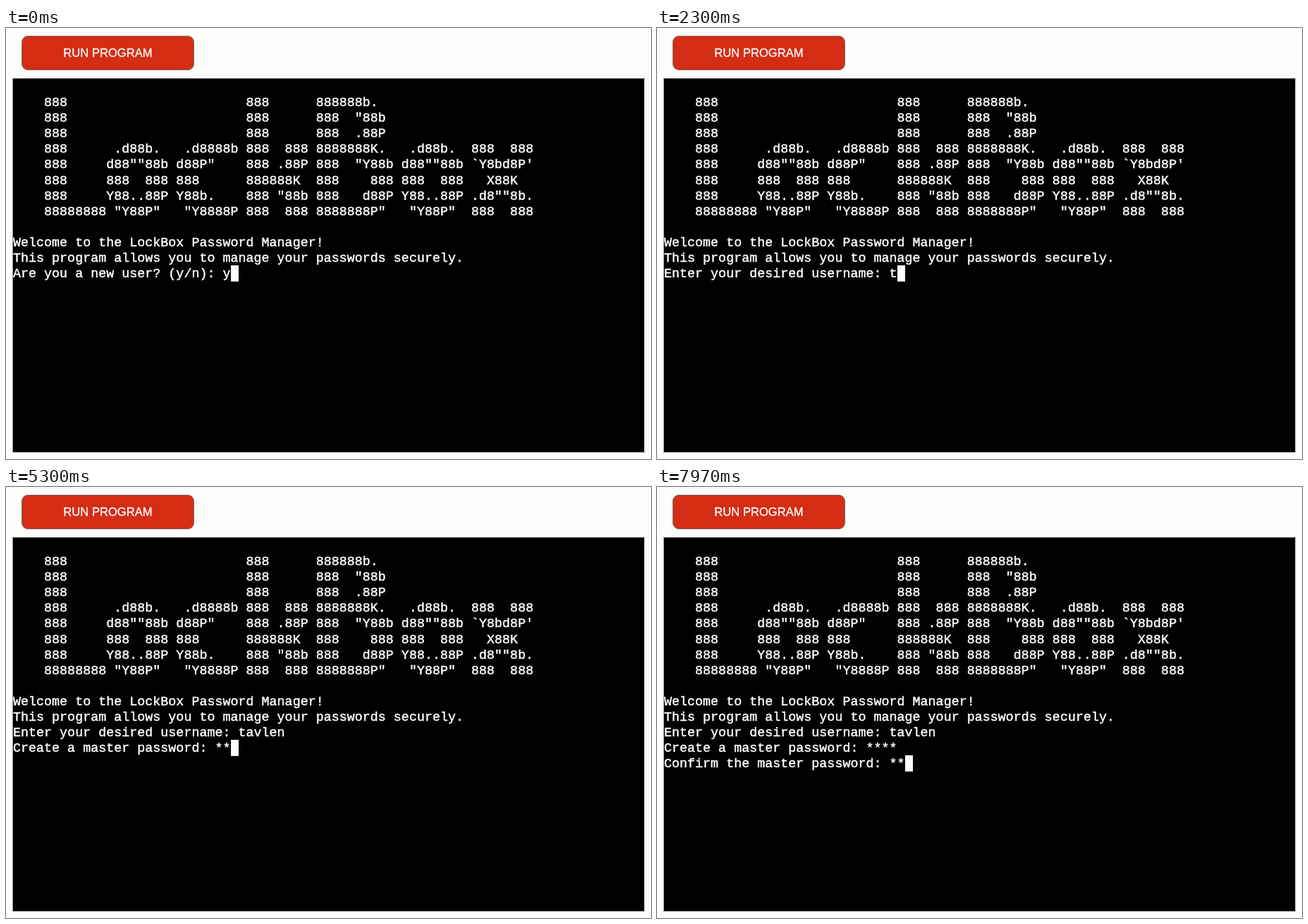
Recreate the animation shown at these times as an HTML page. Size 915 by 612 pixels, loop 8 s.

```html
<!DOCTYPE html>
<html lang="en">
<head>
<meta charset="utf-8">
<title>LockBox terminal</title>
<style>
  html, body { margin: 0; width: 100%; height: 100%; overflow: hidden; background: #fdfdfb; }
  .run {
    position: absolute; left: 22px; top: 11px; width: 245px; height: 49px;
    box-sizing: border-box; border: 1.5px solid #77706c; border-radius: 9px;
    background: #d42d14; color: #fff; -webkit-text-stroke: 0.3px #fff;
    font: 16.6px/47px "Liberation Sans", Arial, sans-serif; text-align: center; white-space: nowrap;
  }
  .term {
    --row: 22.1px; --col: 11.03px;
    position: absolute; left: 10px; top: 72px; width: 895px; height: 530px;
    overflow: hidden; background: #000; color: #fff; box-shadow: 0 0 0 1px #0006;
    font: 18.38px/var(--row) "Liberation Mono", "Courier New", monospace;
  }
  pre {
    position: absolute; left: 0; top: 2px; margin: 0; font: inherit;
    -webkit-text-stroke: 0.45px #fff;
  }
  #cursor {
    position: absolute; width: 11px; height: 23px; background: #fff;
    left: calc(var(--x) * var(--col)); top: calc(var(--y) * var(--row));
  }
</style>
</head>
<body>
<div class="run">RUN PROGRAM</div>
<div class="term"><pre id="screen"></pre><div id="cursor"></div></div>
<script>
const LOOP = 8000;
const intro = String.raw`
    888                       888      888888b.
    888                       888      888  "88b
    888                       888      888  .88P
    888      .d88b.   .d8888b 888  888 8888888K.   .d88b.  888  888
    888     d88""88b d88P"    888 .88P 888  "Y88b d88""88b ${"`"}Y8bd8P'
    888     888  888 888      888888K  888    888 888  888   X88K
    888     Y88..88P Y88b.    888 "88b 888   d88P Y88..88P .d8""8b.
    88888888 "Y88P"   "Y8888P 888  888 8888888P"   "Y88P"  888  888

Welcome to the LockBox Password Manager!
This program allows you to manage your passwords securely.`.split("\n");

// Each prompt: start time, answer rows kept above it, label, typed text, key times.
const prompts = [
  { at: 0, keep: 0, label: "Are you a new user? (y/n): ", input: "y", keys: [0] },
  { at: 1140, keep: 0, label: "Enter your desired username: ", input: "tavlen",
    keys: [2300, 2470, 2640, 2940, 3140, 3270] },
  { at: 3770, keep: 1, label: "Create a master password: ", input: "****",
    keys: [4600, 4770, 6540, 6570] },
  { at: 6940, keep: 2, label: "Confirm the master password: ", input: "**",
    keys: [7640, 7800] }
];

const screen = document.getElementById("screen");
const cursor = document.getElementById("cursor");
let shown = "";

function linesAt(t) {
  let answers = [];
  for (const { at, keep, label, input, keys } of prompts) {
    if (t < at) break;
    const typed = keys.filter(k => k <= t).length;
    answers = [...answers.slice(0, keep), label + input.slice(0, typed)];
  }
  return [...intro, ...answers];
}

function draw(now) {
  const lines = linesAt(now % LOOP);
  const text = lines.join("\n");
  if (text !== shown) {
    screen.textContent = shown = text;
    cursor.style.setProperty("--x", lines.at(-1).length);
    cursor.style.setProperty("--y", lines.length - 1);
  }
  requestAnimationFrame(draw);
}
draw(performance.now());
</script>
</body>
</html>
```
